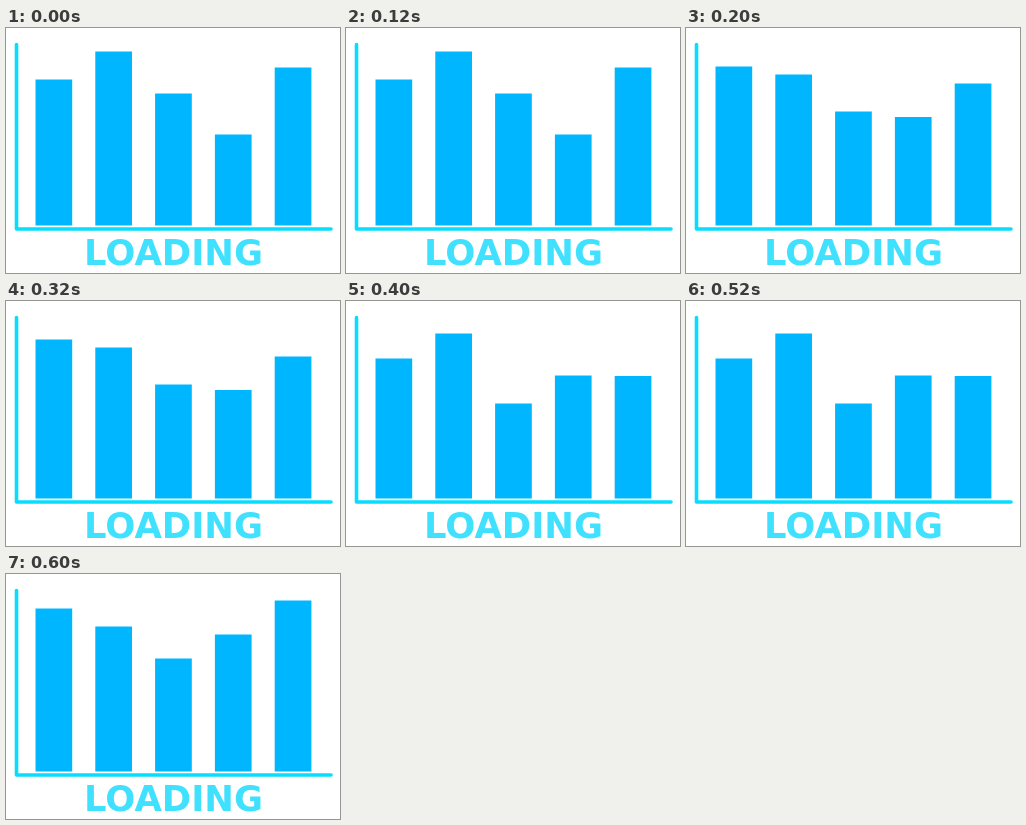
These frames come from a looping animation (334x245 px, 0.8 s). An HTML page:

```html
<!DOCTYPE html>
<html lang="en">
<head>
<meta charset="utf-8">
<title>Loading</title>
<style>
html, body { margin: 0; width: 100%; height: 100%; overflow: hidden; background: #fff; }
svg { display: block; }
text { font: bold 35.4px "DejaVu Sans", sans-serif; fill: #40e0ff; }
</style>
</head>
<body>
<svg width="334" height="245" viewBox="0 0 334 245">
  <path id="bars" fill="#00b7ff"/>
  <path d="M10.5 16.5V201H325" fill="none" stroke="#08dcff" stroke-width="3.6" stroke-linecap="round" stroke-linejoin="round"/>
  <text x="167.5" y="237.2" text-anchor="middle">LOADING</text>
</svg>
<script>
const STEP = 200;
const BASE = 197.5;
const WIDTH = 36.7;
const GAP = 59.8;

// Each bar cycles through its own four heights
const heights = ["146 159 140 163", "174 151 165 145", "132 114 95 113", "91 108.5 123 137", "158 142 122.5 171"]
  .map(cycle => cycle.split(" "));
const bars = document.getElementById("bars");

function draw(time) {
  const step = Math.floor(time / STEP) % 4;
  bars.setAttribute("d", heights.map((cycle, i) =>
    `M${29.5 + i * GAP} ${BASE}v-${cycle[step]}h${WIDTH}v${cycle[step]}z`).join(""));
}

const start = performance.now();
function tick() {
  draw(performance.now() - start);
  requestAnimationFrame(tick);
}
tick();
</script>
</body>
</html>
```
